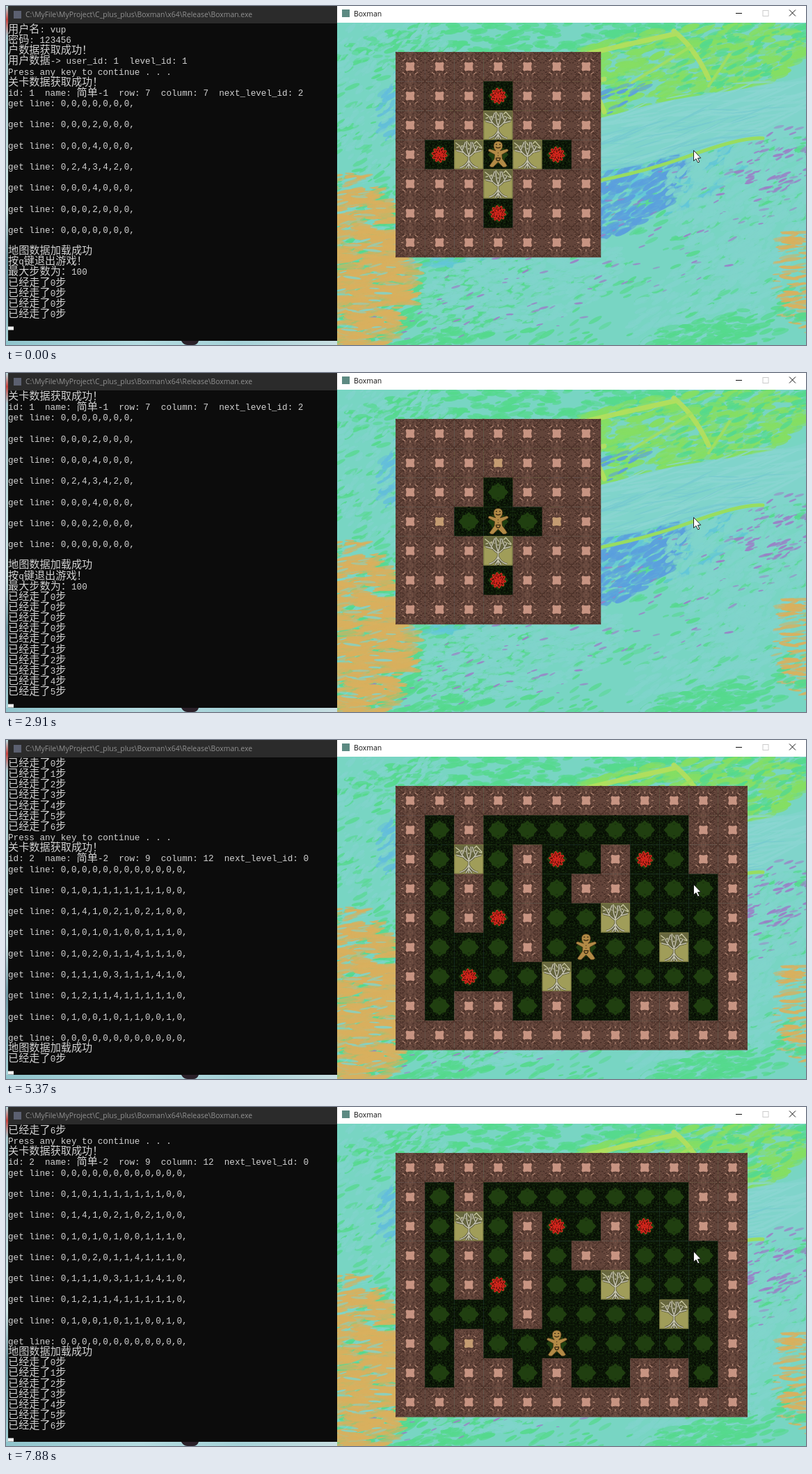
Animation, 1150 px wide and 487 px high, one loop 8 s. Source, as an HTML page with a canvas:

```html
<!DOCTYPE html>
<html lang="zh">
<head>
<meta charset="utf-8">
<title>Boxman</title>
<style>
html, body { margin: 0; width: 100%; height: 100%; overflow: hidden; background: #7ad6c8; }
canvas, svg { position: absolute; left: 0; top: 0; display: block; }
text { white-space: pre; }
.ui { font: 10.4px 'Open Sans', 'Noto Sans', sans-serif; }
.en { font: 12.64px 'Liberation Mono', monospace; }
.zh { font: 15.17px 'Noto Sans CJK SC', 'Noto Sans CJK', sans-serif; }
.msg { font: 33.65px 'Noto Sans CJK SC', 'Noto Sans CJK', sans-serif; }
</style>
</head>
<body>
<canvas id="paint" width="1150" height="487"></canvas>
<svg width="1150" height="487" viewBox="0 0 1150 487">
  <defs id="defs">
    <linearGradient id="edge" x2="0" y2="1">
      <stop offset="0" stop-color="#b9dde0"/><stop offset=".04" stop-color="#c8423c"/>
      <stop offset=".09" stop-color="#a9cdd2"/><stop offset=".6" stop-color="#cfe6e6"/>
      <stop offset=".75" stop-color="#6f9aa4"/><stop offset="1" stop-color="#a8d4da"/>
    </linearGradient>
    <linearGradient id="desk">
      <stop offset="0" stop-color="#8fc4cc"/><stop offset=".4" stop-color="#b4dbe0"/>
      <stop offset=".7" stop-color="#a5d2d8"/><stop offset="1" stop-color="#c9dfe2"/>
    </linearGradient>
  </defs>

  <g id="board"></g>
  <g id="message">
    <rect x="527" y="238" width="572.5" height="34"/>
    <text class="msg" x="527" y="267.5" fill="#00ad00">此关已经通关，任意键跳转到下一关！</text>
  </g>

  <rect x="476" width="674" height="24" fill="#fff"/>
  <rect x="483" y="5" width="11" height="11" fill="#5d8a82"/>
  <text class="ui" x="500" y="14.5" fill="#111">Boxman</text>
  <path d="M1049 10.5h9M1126 5.5l9 9m0-9l-9 9" stroke="#111" fill="none"/>
  <rect x="1088" y="6.5" width="8" height="8" fill="none" stroke="#ccc"/>

  <rect width="3" height="487" fill="url(#edge)"/>
  <rect y="481" width="476" height="6" fill="url(#desk)"/>
  <path d="M252 481h25q-2 6-8 6h-8q-6 0-9-6" fill="#2a2029"/>
  <rect x="3" width="473" height="25" fill="#2b2b2b"/>
  <rect x="11" y="7" width="11" height="11" fill="#5c6070"/>
  <text class="ui" x="28" y="16" fill="#919191">C:\MyFile\MyProject\C_plus_plus\Boxman\x64\Release\Boxman.exe</text>
  <rect x="3" y="25" width="473" height="456" fill="#0c0c0c"/>
  <g id="log" fill="#d2d2d2"></g>
  <rect id="caret" width="8" height="5" fill="#f2f2f2"/>

  <path d="M988.5 207.5v15l3.5-3 2.6 5.4 2.3-1-2.5-5.2 4.3-.4z" fill="#fff" stroke="#111" stroke-width=".9"/>
</svg>
<script>
const $ = id => document.getElementById(id);
const LOOP = 8000, TILE = 42.14, CELL = 7.585, ROW = 15.15, ROWS = 29;
const WON = 3370, KEY = 4240, NEXT = 4320;

let seed = 7;
const rnd = () => (seed = (seed * 16807) % 2147483647) / 2147483647;

// ---- painted backdrop ----
const ctx = $('paint').getContext('2d');

function dabs(x, y, rx, ry, color, n, len, wid, ang) {
  ctx.fillStyle = color;
  ctx.save();
  ctx.translate(x, y);
  ctx.rotate(ang);
  for (let i = 0; i < n; i++) {
    const a = rnd() * 2 * Math.PI, r = Math.sqrt(rnd()), k = .4 + rnd();
    ctx.globalAlpha = .5 + rnd() * .45;
    ctx.beginPath();
    ctx.ellipse(r * rx * Math.cos(a), r * ry * Math.sin(a), len * k / 2, wid * k / 2, rnd() * .5 - .25, 0, 7);
    ctx.fill();
  }
  ctx.restore();
}

function stroke(color, wid, d) {
  ctx.strokeStyle = color;
  ctx.lineWidth = wid;
  ctx.lineCap = 'round';
  ctx.stroke(new Path2D(d));
}

function paint() {
  const teal = '#80d4cb', green = '#55d98d', blue = '#5b9fdd', lime = '#85de63', gold = '#d9b05e', plum = '#9a7fc6';
  ctx.fillStyle = '#78d5c3';
  ctx.fillRect(0, 0, 1150, 487);
  dabs(813, 255, 440, 330, green, 1300, 18, 5, -.4);
  dabs(800, 40, 330, 40, green, 500, 18, 6, -.1);
  dabs(610, 370, 150, 130, green, 700, 18, 6, -.3);
  dabs(610, 150, 75, 75, '#63bddc', 240, 16, 6, -.6);
  dabs(800, 285, 270, 60, '#62c6d8', 420, 22, 6, -.25);
  dabs(890, 275, 105, 45, blue, 260, 20, 6, -.5);
  dabs(700, 320, 150, 25, blue, 110, 24, 4, -.1);
  dabs(560, 130, 110, 120, teal, 420, 13, 5, -.7);
  dabs(895, 110, 265, 65, lime, 800, 22, 7, -.22);
  dabs(710, 175, 60, 35, lime, 170, 20, 7, -.4);
  dabs(1060, 60, 110, 50, green, 110, 16, 5, -.4);
  dabs(800, 160, 130, 20, blue, 70, 20, 5, -.35);
  dabs(1060, 270, 110, 110, teal, 650, 17, 7, -.6);
  dabs(740, 400, 150, 62, teal, 700, 16, 6, -.25);
  dabs(1010, 420, 130, 60, teal, 350, 18, 6, -.5);
  ctx.globalAlpha = .9;
  stroke('#b5df5c', 7, 'M640 118Q800 75 962 40M960 36Q990 60 1010 104M830 82l30 70M655 195Q760 120 860 105');
  stroke('#a2de60', 4, 'M900 110L985 58M1040 70l-30 45M690 150l120-50');
  ctx.fillStyle = teal;
  ctx.globalAlpha = 1;
  ctx.fill(new Path2D('M775 205Q850 150 1000 128T1152 98V186Q1020 195 930 222T770 230z'));
  dabs(970, 170, 200, 42, '#8bd6d2', 130, 60, 3, -.24);
  dabs(950, 190, 170, 30, '#77cbd0', 60, 55, 2, -.22);
  dabs(705, 217, 55, 9, plum, 60, 16, 3, -.15);
  dabs(660, 300, 60, 14, plum, 45, 15, 3, .1);
  dabs(1110, 220, 60, 45, plum, 80, 12, 3, -.4);
  dabs(820, 360, 330, 100, plum, 130, 11, 2.5, -.3);
  stroke('#98dd60', 5, 'M790 262Q900 245 980 216T1088 190');
  dabs(505, 385, 75, 120, gold, 520, 34, 6, -.06);
  dabs(490, 265, 50, 24, gold, 70, 22, 4, -.1);
  dabs(1145, 395, 38, 78, gold, 130, 24, 4, -.1);
  dabs(500, 355, 55, 130, teal, 60, 22, 3, -.1);
  dabs(1030, 470, 120, 28, green, 160, 20, 6, -.2);
}

// ---- tiles ----
// Specks mirrored into all four quarters.
function specks(n, color, w = 1.1) {
  let d = '';
  for (let i = 0; i < n; i++) {
    const x = rnd() * 20, y = rnd() * 20;
    for (const px of [x, 41 - x]) for (const py of [y, 42 - y]) d += `M${px.toFixed(1)} ${py.toFixed(1)}h1.2`;
  }
  return `<path d="${d}" stroke="${color}" stroke-width="${w}"/>`;
}

const base = color => `<rect width="42.4" height="42.4" fill="${color}"/>`;

function rosette() {
  const ring = (r, k, n) => {
    let d = '';
    for (let i = 0; i <= 90; i++) {
      const a = i / 90 * 2 * Math.PI, q = r + k * Math.sin(n * a);
      d += `${i ? 'L' : 'M'}${(21 + q * Math.cos(a)).toFixed(1)} ${(21 + q * Math.sin(a)).toFixed(1)}`;
    }
    return d;
  };
  return `<path d="${ring(9.3, 1.7, 10)}${ring(6, 2, 7)}${ring(2.8, 1.5, 5)}" fill="#5a1208" stroke="#e0281f" stroke-width="1.3"/>`;
}

function makeTiles() {
  const wall = core => base('#62443a') + specks(62, '#432b24') + specks(30, '#7d5a4c') +
    `<path d="M0 0L42 42M42 0L0 42" stroke="#4c3229" stroke-width="1.2"/>
     <path d="M10 13l4-3M32 13l-4-3M10 29l4 3M32 29l-4 3M21 8v3M21 31v3M8 21h3M31 21h3" stroke="#b58a77" stroke-width="1.1"/>
     <path d="M16 14.5l5 1 5-1 1.5 1.5-1 5 1 5-1.5 1.5-5-1-5 1-1.5-1.5 1-5-1-5z" fill="${core}"/>`;
  const floor = base('#0a1406') + specks(46, '#1b3310') + specks(26, '#020401') +
    '<path d="M21 7l4 4 5 1 1 4 5 5-5 5-1 4-5 1-4 4-4-4-5-1-1-4-5-5 5-5 1-4 5-1z" fill="#203f10"/>' + specks(9, '#152b0b');
  const roots = 'M21 42V21M21 29Q17 38 8 40M21 29Q25 38 34 40M21 34l-5 8M21 34l5 8M21 24Q13 20 8 9M21 24Q29 20 34 9M21 22Q17 13 18 3M21 22Q25 13 24 3M14 18L3 15M28 18l11-3M12 14l4-11M30 14L26 3';
  const box = base('#a09d59') +
    '<path d="M0 0h42v14q-10 1-21 11Q10 15 0 14z" fill="#68683f"/>' +
    `<path d="M2 4l9 7 7-9 6 8 8-8 8 9M3 11l10-3 8 5 9-5 10 4" stroke="#c9c8a0" fill="none" stroke-width="1.3"/>
     <path d="${roots}" stroke="#55543a" stroke-width="3" fill="none"/>
     <path d="${roots}" stroke="#c6c4ae" stroke-width="1.5" fill="none"/>
     <path d="M.5.5h41v41h-41z" fill="none" stroke="#77753f"/>`;
  const hero = `<path d="M14.5 8Q15 2 21 2t6.5 6q0 5-3.5 7.5l9-2.5q3.5 0 2.5 3l-9 5 .5 6q5 6 7 10-2 3-6 2l-7-7-7 7q-4 1-5.5-2l7-10 .5-6-9-5q-1-3 2.500-3l8 2.5Q14.5 13 14.5 8z" fill="#b28a46" stroke="#3a2a10" stroke-width=".8"/>
     <path d="M17.5 6.5h2m3 0h2M17.5 10q3.5 3 7 0M18 26h6q-.5 4-3 4t-3-4M21 18v1m0 3v1" fill="none" stroke="#33230d" stroke-width="1.2"/>`;
  const tiles = [wall('#c79482'), floor, floor + rosette(), hero, box, wall('#c49c72')];
  $('defs').innerHTML += tiles.map((t, i) => `<g id="t${i}">${t}</g>`).join('');
}

// ---- game: 0 wall, 1 floor, 2 goal, 3 player, 4 box, 5 box on goal ----
const levels = [
  { name: '简单-1', next: 2,
    map: ['0000000', '0002000', '0004000', '0243420', '0004000', '0002000', '0000000'],
    moves: [[260, 'R'], [1190, 'L'], [1650, 'L'], [2110, 'R'], [2510, 'U'], [2910, 'D'], [3310, 'D']] },
  { name: '简单-2', next: 0,
    map: ['000000000000', '010111111100', '014102102100', '010101001110', '010201141110',
      '011103111410', '012114111110', '010010110010', '000000000000'],
    moves: [[5370, 'R'], [5900, 'D'], [6360, 'L'], [6760, 'L'], [7290, 'L'], [7550, 'R'], [7880, 'R']] }
];
const DIR = { R: [1, 0], L: [-1, 0], U: [0, -1], D: [0, 1] };

function drawBoard(level, t) {
  const grid = level.map.map(r => [...r].map(Number));
  let y = grid.findIndex(r => r.includes(3)), x = grid[y].indexOf(3);
  grid[y][x] = 1;
  for (const [at, key] of level.moves) {
    if (at > t) break;
    const [dx, dy] = DIR[key];
    x += dx;
    y += dy;
    if (grid[y][x] === 4) {
      grid[y][x] = 1;
      grid[y + dy][x + dx] = grid[y + dy][x + dx] === 2 ? 5 : 4;
    }
  }
  const put = (k, c, r) => `<use href="#t${k}" x="${(560 + c * TILE).toFixed(2)}" y="${(66 + r * TILE).toFixed(2)}"/>`;
  $('board').innerHTML = grid.map((row, r) => row.map((k, c) => put(k, c, r)).join('')).join('') + put(3, x, y);
}

// ---- console ----
const PROMPT = 'Press any key to continue . . . ';
const log = [];
const say = (at, ...lines) => lines.forEach(text => log.push({ at, text }));
const count = n => `已经走了${n}步`;

function announce(at, id) {
  const { name, next, map } = levels[id - 1];
  say(at, '关卡数据获取成功！', `id: ${id}  name: ${name}  row: ${map.length}  column: ${map[0].length}  next_level_id: ${next}`);
  map.forEach((row, i) => {
    say(at, `get line: ${[...row].join(',')},`);
    if (id === 1 || i < map.length - 1) say(at, '');
  });
  say(at, '地图数据加载成功');
}

function fillLog() {
  say(0, '用户名: vup', '密码: 123456', '户数据获取成功！', '用户数据-> user_id: 1  level_id: 1', PROMPT);
  announce(0, 1);
  say(0, '按q键退出游戏！', '最大步数为：100', ...Array(4).fill(count(0)));
  levels[0].moves.forEach(([at], i) => say(at, count(i)));
  say(KEY, PROMPT);
  announce(NEXT, 2);
  levels[1].moves.forEach(([at], i) => say(at, count(i)));
}

function lineMarkup(text, row) {
  let col = 0;
  return (text.match(/[ -~]+|[^ -~]+/g) || []).map(run => {
    const wide = run.charCodeAt(0) > 126, x = 3 + col * CELL;
    col += run.length * (wide ? 2 : 1);
    return `<text class="${wide ? 'zh' : 'en'}" x="${x.toFixed(2)}" y="${(38 + row * ROW).toFixed(2)}">${run.replace(/>/g, '&gt;')}</text>`;
  }).join('');
}

function drawLog(t) {
  const lines = log.filter(l => l.at <= t).map(l => l.text).slice(-ROWS);
  const waiting = t >= WON && t < KEY;
  const busy = (t >= 2510 && t < 2580) || (t >= 6360 && t < 6430);
  const row = lines.length;
  if (waiting) lines.push(PROMPT);
  $('log').innerHTML = lines.map(lineMarkup).join('');
  $('caret').setAttribute('x', 3 + (waiting ? PROMPT.length * CELL : 0));
  $('caret').setAttribute('y', 36.3 + row * ROW);
  $('caret').style.display = busy ? 'none' : '';
}

// ---- timeline ----
function render(t) {
  const won = t >= WON && t < NEXT;
  $('board').style.display = won ? 'none' : '';
  $('message').style.display = won ? '' : 'none';
  drawBoard(levels[t < NEXT ? 0 : 1], t);
  drawLog(t);
}

paint();
makeTiles();
fillLog();

const cues = [...new Set([0, 2580, WON, KEY, NEXT, 6430, ...levels.flatMap(l => l.moves.map(m => m[0]))])].sort((a, b) => a - b);
const begin = performance.now();
let shown = -1;

function tick() {
  const t = (performance.now() - begin) % LOOP;
  const cue = cues.filter(c => c <= t).pop();
  if (cue !== shown) render(shown = cue);
  requestAnimationFrame(tick);
}
tick();
</script>
</body>
</html>
```
